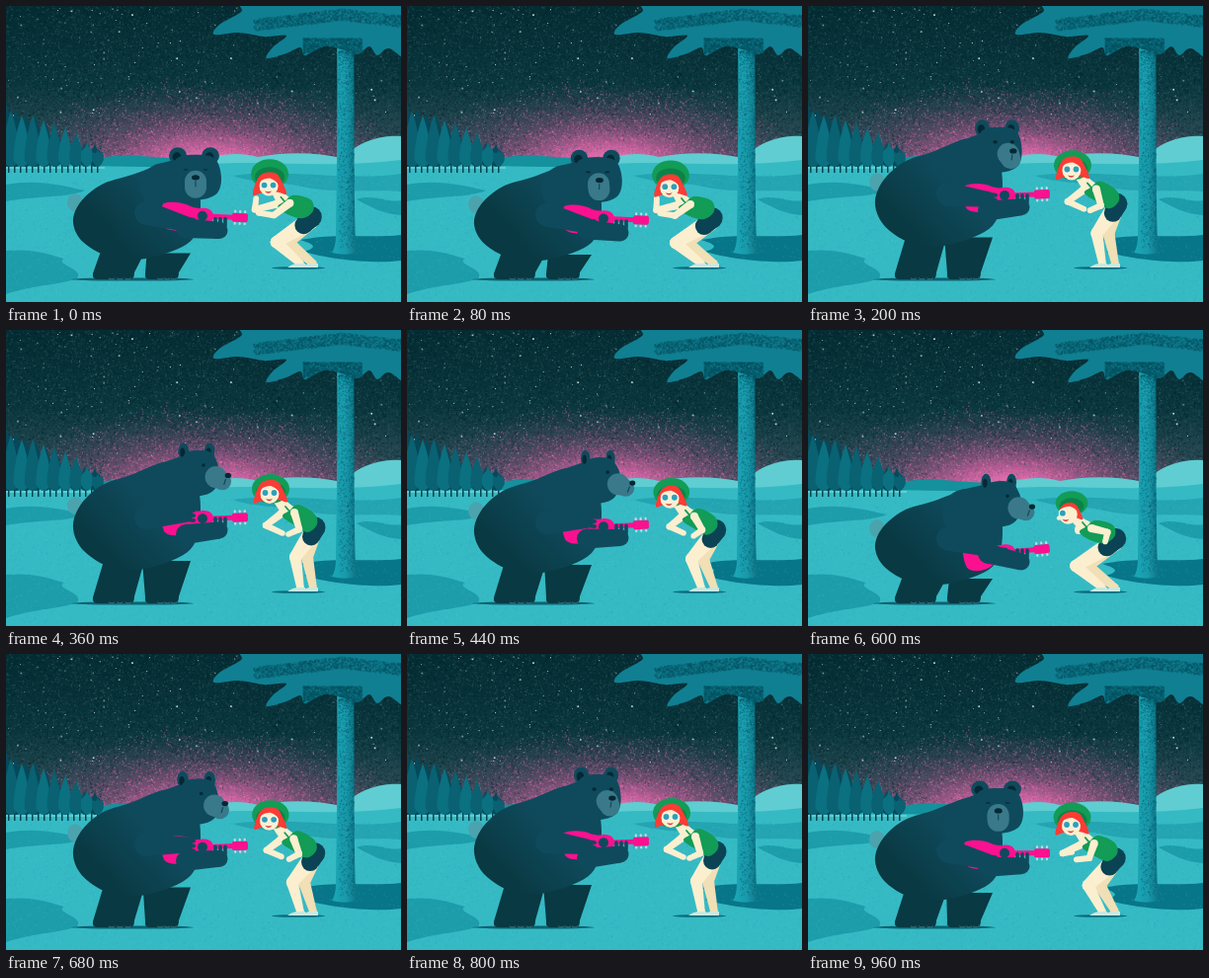
Write an HTML page with a canvas that moves like this. It is 400x300 px and loops after 1 s.

```html
<!DOCTYPE html>
<html lang="en">
<head>
<meta charset="utf-8">
<title>Night serenade</title>
<style>
html, body { margin: 0; width: 100%; height: 100%; overflow: hidden; background: #06323a; }
canvas, svg { position: absolute; left: 0; top: 0; width: 400px; height: 300px; }
</style>
</head>
<body>
<canvas id="scene" width="400" height="300"></canvas>
<svg viewBox="0 0 400 300">
  <defs>
    <linearGradient id="fur" gradientUnits="userSpaceOnUse" x1="178" y1="165" x2="105" y2="235">
      <stop offset=".3" stop-color="#0f4a5c"/><stop offset="1" stop-color="#093942"/>
    </linearGradient>
  </defs>
  <g id="cast"></g>
</svg>
<script>
const LOOP = 1000, STEP = 40;
const FUR = '#0f4a5c', FUR_DARK = '#093942', INK = '#052833', SNOUT = '#39798a';
const PINK = '#fb118f', SKIN = '#fbefcf', SKIN_SHADE = '#f1dfb6';
const GREEN = '#129c56', GREEN_DARK = '#0c8249', RED = '#fb3c36', SHORTS = '#0b4354';

// ---------- shapes ----------

// smooth closed outline through the points
function blob(points) {
  const n = points.length, at = i => points[(i + n) % n];
  const ctrl = (i, s) => at(i).map((v, j) => v + s * (at(i + 1)[j] - at(i - 1)[j]) / 6);
  return 'M' + at(0) + points.map((_, i) => `C${ctrl(i, 1)} ${ctrl(i + 1, -1)} ${at(i + 1)}`).join('') + 'Z';
}
const mix = (a, b, u) => a.map((v, i) => v + (b[i] - v) * u);
const add = ([x, y], dx, dy) => [x + dx, y + dy];
const around = (p, offsets) => offsets.map(([dx, dy]) => add(p, dx, dy));
const path = (d, fill) => `<path d="${d}" fill="${fill}"/>`;
const line = (pts, w, color) =>
  `<path d="M${pts.join('L')}" fill="none" stroke="${color}" stroke-width="${w}" stroke-linecap="round" stroke-linejoin="round"/>`;
const oval = ([x, y], rx, ry, fill) => `<ellipse cx="${x}" cy="${y}" rx="${rx}" ry="${ry}" fill="${fill}"/>`;

// tapered segment with round ends
function limb(a, b, ra, rb, fill) {
  const dx = b[0] - a[0], dy = b[1] - a[1], len = Math.hypot(dx, dy) || 1;
  const side = (p, r) => add(p, -dy / len * r, dx / len * r);
  return path(`M${side(a, ra)}L${side(b, rb)}L${side(b, -rb)}L${side(a, -ra)}Z`, fill) +
    oval(a, ra, ra, fill) + oval(b, rb, rb, fill);
}

// ---------- still scenery ----------

function drawScene() {
  const c = document.getElementById('scene').getContext('2d');
  let seed = 7;
  const rnd = () => (seed = (seed * 16807) % 2147483647) / 2147483647;
  const fill = (d, color) => { c.fillStyle = color; c.fill(new Path2D(d)); };
  const ramp = (g, stops) => (stops.forEach(s => g.addColorStop(...s)), g);
  const speck = (x, y, size, color, alpha) => {
    c.globalAlpha = alpha;
    c.fillStyle = color;
    c.fillRect(x, y, size, size);
    c.globalAlpha = 1;
  };

  // sky with a pink glow on the horizon
  c.fillStyle = ramp(c.createLinearGradient(0, 0, 0, 160), [[0, '#052d34'], [.5, '#0b383f'], [1, '#3b5560']]);
  c.fillRect(0, 0, 400, 165);
  c.save();
  c.translate(205, 163);
  c.scale(2.5, 1);
  c.fillStyle = ramp(c.createRadialGradient(0, 0, 0, 0, 0, 85),
    [[0, '#f583bf'], [.25, 'rgba(219,96,164,.85)'], [.6, 'rgba(130,70,115,.45)'], [1, 'rgba(60,60,80,0)']]);
  c.fillRect(-85, -85, 170, 90);
  c.restore();
  for (let i = 0; i < 20000; i++) {
    const x = rnd() * 400, y = rnd() * 158;
    const glow = Math.max(0, 1 - Math.hypot((x - 205) / 215, (y - 165) / 95));
    const r = rnd();
    speck(x, y, 1.3, r < glow ? '#f27ab9' : r < .7 ? '#05272e' : '#3d6a6c', .15 + rnd() * .3);
  }
  for (let i = 0; i < 170; i++)
    speck(rnd() * 400, rnd() ** 1.3 * 118, rnd() < .15 ? 1.7 : 1, '#e4f2e6', .3 + rnd() * .6);

  // hills and snow
  fill('M0 157 C60 150 80 156 110 152 C140 150 160 156 185 154 L260 160 V180 H0Z', '#14919d');
  fill('M190 160 C210 150 235 147 255 153 C290 147 315 149 340 154 C355 140 375 130 400 132 V190 H190Z', '#5fcdd1');
  fill('M0 164 C70 157 130 168 210 160 C265 156 330 165 400 156 V300 H0Z', '#35bac4');
  fill('M0 181 C30 175 58 182 80 187 C60 195 30 192 0 198Z', '#1d9daa');
  fill('M230 172 C280 164 350 178 400 170 V188 C360 186 330 190 300 183 C280 178 250 180 230 172Z', '#24a5b1');
  fill('M355 196 C370 190 388 200 400 197 V212 C382 211 370 204 355 196Z', '#1d9daa');
  fill('M0 248 C20 246 38 249 59 256 C48 262 80 266 72 276 C55 283 30 282 0 292Z', '#1d9daa');
  fill('M298 237 C340 229 365 236 400 232 V258 C370 262 325 256 302 249 C318 244 310 241 298 237Z', '#087689');
  for (let i = 0; i < 2600; i++)
    speck(rnd() * 400, 170 + rnd() * 130, 1.3, rnd() < .5 ? '#6bdadb' : '#15899a', .14);

  // firs shrink toward the right
  const fir = (x, top, w, color) => fill(
    `M${x} ${top} C${x + w * .5} ${top + 12} ${x + w} 140 ${x + w} 156 Q${x} 170 ${x - w} 156 C${x - w} 140 ${x - w * .5} ${top + 12} ${x} ${top}Z`, color);
  c.fillStyle = '#62cdd2';
  c.fillRect(0, 163, 100, 2);
  for (let x = 2; x < 98; x += 6) { c.fillStyle = '#06434f'; c.fillRect(x, 160, 1.5, 9); }
  for (let i = 0; i < 10; i++) fir(i * 10, 94 + i * 5 + rnd() * 6, 9 - i * .3, '#05495a');
  for (let i = 0; i < 9; i++) fir(5 + i * 11, 99 + i * 4.6 + rnd() * 10, 9 - i * .4, i % 2 ? '#0b7080' : '#096171');

  // pine
  fill('M335 30 H352 C353 110 352 190 354 235 Q355 246 357 249 Q345 254 330 250 Q334 244 334 232 C335 170 336 100 335 30Z',
    ramp(c.createLinearGradient(334, 0, 355, 0), [[0, '#1aa4b4'], [.5, '#1899aa'], [1, '#0d7485']]));
  for (let i = 0; i < 1100; i++)
    speck(352 - rnd() ** 1.5 * 16, 45 + rnd() ** 1.8 * 200, 1.1, '#075566', .4);
  const crown = blob([[250, -8], [238, 6], [216, 19], [211, 29], [236, 27], [262, 31], [284, 30], [270, 42], [264, 53],
    [284, 48], [298, 42], [303, 50], [322, 41], [340, 44], [356, 49], [368, 41], [376, 50], [388, 43], [412, 54], [412, -8]]);
  fill(crown, '#107f92');
  c.save();
  c.clip(new Path2D(crown));
  for (let i = 0; i < 1500; i++) {
    const x = 250 + rnd() * 150;
    speck(x, 2 + rnd() * 12 + Math.abs(x - 340) * .12, 1.5, '#07505f', .35);
    speck(300 + rnd() * 60, 32 + rnd() * 16, 1.5, '#07505f', .3);
  }
  c.restore();
}

// ---------- timing ----------

// two quick dips per loop
function crouchAt(t) {
  const d = ((t - 55 + 250 + LOOP) % 500) - 250;
  return Math.abs(d) > 160 ? 0 : Math.min(1, 1.25 * Math.cos(Math.PI * d / 320) ** 2);
}
// 0 faces the viewer, 1 is profile
const turnAt = t => (1 - Math.cos(2 * Math.PI * t / LOOP)) / 2;

// ---------- bear ----------

const BODY = [[68, 201], [75, 178], [96, 158], [126, 147], [166, 133], [190, 148],
  [197, 184], [187, 222], [145, 241], [108, 241], [79, 224]];

function drawLute(a, b) {
  const turn = Math.atan2(b[1] - a[1], b[0] - a[0]) * 180 / Math.PI;
  const pegs = [59, 64, 69].map(x => oval([x, -6], 1.2, 1.8, '#b5dcdc') + oval([x, 6], 1.2, 1.5, '#b5dcdc')).join('');
  return `<g transform="translate(${a}) rotate(${turn})">` +
    path('M-14 -11 C-6 -14 6 -13 14 -9 Q20 -7 25 -8 C34 -9 37 -4 37 0 C37 7 32 11 25 9 Q19 8 13 12 C6 17 -8 18 -13 12 C-16 5 -17 -6 -14 -11Z', PINK) +
    oval([26, 0], 5, 5, FUR) + pegs + line([[36, 0], [58, 0]], 5, PINK) +
    `<rect x="56" y="-4.5" width="16" height="9" rx="2" fill="${PINK}"/></g>`;
}

function drawBear(c, turn) {
  const sink = ([x, y]) => [x, y + c * (18 + .12 * (220 - y))];
  const yaw = Math.sin(turn * Math.PI / 2);
  const head = add(sink([192 + 4 * turn, 142]), 0, 4 * c);
  const lute = add(sink([173, 192]), 0, 16 * turn * c);
  const peg = add(sink([237, 190]), 0, (5 + 6 * turn) * c);
  const hand = add(lute, 8, 9 - 17 * turn);
  const grip = add(peg, -18, 8);
  const top = 234 + 18 * c;

  const leg = (foot, w, inner, outer) =>
    path(`M${inner} ${top} L${foot} 271 Q${foot - 1} 277 ${foot + 5} 277 H${foot + w - 4} Q${foot + w} 277 ${foot + w} 270 L${outer} ${top}Z`, FUR_DARK) +
    [.45, .65, .85].map(k => oval([foot + w * k, 275.5], 3, 2, '#2f6d7a') + oval([foot + w * k, 274.2], 3, 2, FUR_DARK)).join('');
  const ear = p => oval(p, 9 - 4.5 * turn, 8.5, FUR) + oval(add(p, -1, 1), 4.5 - 2.5 * turn, 4.5, INK);
  const eye = dx => oval(add(head, dx, -5), 2.6 - turn, Math.min(1.8, .6 + 6 * turn), INK);
  const rx = 26 - 8 * turn;
  const skull = blob(around(head, [[-rx * .75, -16], [0, -20], [rx * .75, -16], [rx, 3], [rx * .8, 20], [0, 26], [-rx * .85, 20], [-rx, 4]]));
  const muzzle = add(head, 18 * yaw, 7);
  const tip = add(head, 18 * yaw + 8 * turn, 13 - 2 * turn);
  const nose = add(tip, 7 * turn, -10 + 5 * turn);
  const fingers = [-7, -2, 3].map(dx => line([add(grip, dx, 0), add(grip, dx, -7)], 3.6, FUR)).join('');
  const claws = [-5, 0, 5].map(dy => line([add(hand, 2, dy), add(hand, 9, dy + 1)], 4, FUR)).join('');

  return oval([128, 277], 62, 1.6, '#0c6271') +
    oval(sink([70, 178]), 8, 9, '#4ba3ae') +
    leg(88, 42, 99 - 4 * c, 140) + leg(141, 34, 138 + 5 * c, 187) +
    path(blob(BODY.map(sink)), 'url(#fur)') +
    limb(sink([160, 160]), head, 24, 20, FUR) +
    ear(add(head, -18 + 3 * turn, -19)) + ear(add(head, 15 - 5 * turn, -19)) +
    path(skull, FUR) +
    limb(muzzle, tip, 11, 11 - 2.5 * turn, SNOUT) +
    oval(nose, 4 - turn, 2.6, INK) +
    line([add(nose, -3 * turn, 4), add(nose, -5 * turn, 9)], 1.2, FUR) +
    eye(-10 + 18 * turn) + (turn < .5 ? eye(10 + 10 * turn) : '') +
    drawLute(lute, peg) +
    limb(sink([182, 207]), add(grip, -3, 5), 10, 8.5, FUR) + fingers +
    limb(sink([142, 190]), hand, 12, 8, FUR) + claws;
}

// ---------- dancer ----------

// each joint: upright, crouched facing us, crouched in profile
const DANCER = {
  head: [[267, 165], [266, 183], [264, 186]],
  hat: [[268, 161], [267, 171], [267, 176]],
  neck: [[289, 185], [284, 201], [284, 201]],
  waist: [[308, 195], [304, 206], [304, 206]],
  hip: [[313, 200], [309, 215], [312, 211]],
  knee: [[293, 230], [272, 240], [271, 239]],
  elbow: [[297, 202], [269, 213], [307, 204]],
  hand: [[286, 207], [253, 210], [306, 215]],
  farElbow: [[263, 198], [251, 207], [276, 203]],
  farHand: [[280, 206], [251, 194], [281, 205]]
};

function drawDancer(c, turn) {
  const side = turn * c;
  const p = {};
  for (const [name, [up, front, profile]] of Object.entries(DANCER))
    p[name] = mix(up, mix(front, profile, turn), c);
  const { head, hat, neck, waist, hip, knee } = p;

  const arm = (shoulder, elbow, hand) => limb(shoulder, elbow, 4, 3.2, SKIN) + limb(elbow, hand, 3.2, 2.8, SKIN);
  const leg = (k, ankle, tone) =>
    limb(add(hip, -2, 4), k, 9, 6, tone) + limb(k, ankle, 6, 3.8, tone) +
    path(`M${add(ankle, -4, 0)} L${add(ankle, 5, 0)} L${add(ankle, 5, 4)} H${ankle[0] - 13} Q${add(ankle, -9, 1)} ${add(ankle, -4, 0)}Z`, '#c9e9e2');
  const lens = dx => oval(add(head, dx, 0), 4, 4, '#f4f6e6') + oval(add(head, dx, 0), 2.9, 2.9, '#2f9fb8');
  const hair = 1 - .35 * side;

  return oval([296, 265.5], 27, 1.3, '#0a6b7b') +
    leg(add(knee, 12, 0), [311, 261], SKIN_SHADE) + leg(knee, [298, 261], SKIN) +
    limb(hip, add(mix(hip, knee, .25), 1, 2), 10.5, 9, SHORTS) +
    arm(add(neck, -10, 1), p.farElbow, p.farHand) +
    limb(add(head, 7, 6), add(neck, -3, -1), 4.5, 7, SKIN) +
    path(blob([...around(neck, [[-9, 4], [-2, -2], [7, -8]]), ...around(waist, [[4, -9], [7, 2], [-3, 10]]), add(neck, 2, 12)]), GREEN) +
    line([add(neck, -6, -6), add(neck, 0, 1)], 1.8, GREEN) +
    oval(hat, 19 - 3 * side, 15 - 3 * side, GREEN) +
    oval(add(hat, 0, 3), 15 - 3 * side, 10 - 2 * side, GREEN_DARK) +
    path(blob(around(head, [[-12, -5], [-5, -12], [7, -12], [13, -4], [18, 9], [8, 7], [-7, 8], [-16, 10]].map(([x, y]) => [x * hair + 2 * side, y * hair]))), RED) +
    oval(add(head, -side, 1), 9.5, 10, SKIN) +
    limb(add(head, -5, 3), add(head, -5 - 6 * side, 5), 4, 2, SKIN) +
    path(`M${add(head, -10, -3)} Q${add(head, -7, -11)} ${add(head, 2, -11)} Q${add(head, 10, -10)} ${add(head, 11, 1)} Q${add(head, 6, -6)} ${add(head, 1, -7)} Q${add(head, -5, -7)} ${add(head, -10, -3)}Z`, RED) +
    lens(-4.5 - 2 * side) + (side < .5 ? lens(4.5) : '') +
    path(`M${add(head, -4 - 3 * side, 6)} q3.5 1.5 7 0 q-3.5 4.5 -7 0Z`, '#dd2b3d') +
    arm(add(neck, 3, 0), p.elbow, p.hand);
}

// ---------- playback ----------

drawScene();
const cast = document.getElementById('cast');
const start = performance.now();
let shown = -1;

function tick() {
  const t = Math.floor(((performance.now() - start) % LOOP) / STEP) * STEP;
  if (t !== shown) {
    const c = crouchAt(t), turn = turnAt(t);
    cast.innerHTML = drawBear(c, turn) + drawDancer(c, turn);
    shown = t;
  }
  requestAnimationFrame(tick);
}
tick();
</script>
</body>
</html>
```
